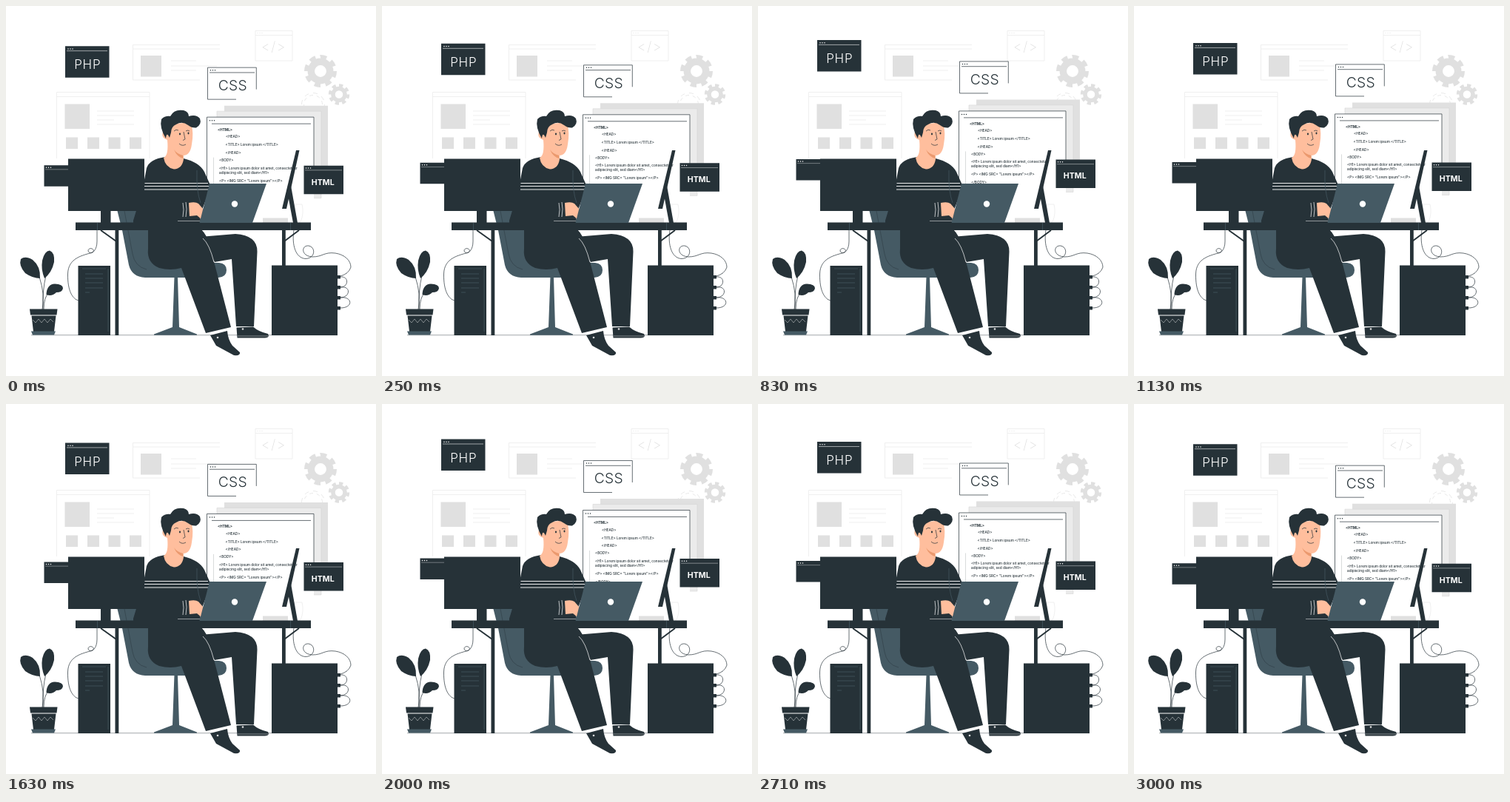
Write an HTML page that moves like this. It is 500 px wide and 500 px high and loops after 3.04 s.

```html
<!DOCTYPE html>
<html lang="en">
<head>
<meta charset="utf-8">
<title>Coder at a desk</title>
<style>
  html, body { margin: 0; width: 100%; height: 100%; overflow: hidden; background: #fff; }
  svg { display: block; width: 100%; height: 100%; font-family: Inter, "Open Sans", sans-serif; }
  .d { fill: #263238; }
  .s { fill: #455a64; }
  .g { fill: #e0e0e0; }
  .skin { fill: #ffbe9d; }
  .w { fill: #fff; }
  .line { fill: none; stroke: #263238; stroke-width: .7; }
  .pale { fill: none; stroke: #ebebeb; stroke-width: .8; }
  .light { fill: none; stroke: #fff; stroke-width: .7; }
  .dim { fill: none; stroke: #455a64; stroke-width: .7; }
  .dots { stroke-linecap: round; stroke-dasharray: 0 3; stroke-width: 1.5; }
  .mid { text-anchor: middle; }
  .code { font-size: 4.7px; font-weight: 500; }
  .code .b { font-weight: 700; }
  .gear { fill: none; stroke: #e0e0e0; }
</style>
</head>
<body>
<svg viewBox="0 0 500 500">
  <!-- pale windows -->
  <g class="pale">
    <path d="M289 52.500H171.500V100M171.500 58H289M171.500 100H262M223 74h34M223 81h62M223 87h34"/>
    <path d="M337 33.500h50V74H337zM337 39.500h50"/>
    <path class="dots" d="M340 36.500h7"/>
    <path d="M68.500 206V116.500H194V206M68.500 122.500H194M123 142h50M123 148h50M123 154h23M123 160h50"/>
  </g>
  <g class="g">
    <path d="M182 67h28v28.500h-28zM79.500 132.500H113V166H79.500z"/>
    <path d="M81 177.500h16V193H81zM110 177.500h16V193h-16zM138.500 177.500h16V193h-16zM167 177.500h16V193h-16z"/>
    <text class="mid" x="362" y="61" font-size="18" font-weight="200" letter-spacing="1.500">&lt;/&gt;</text>
  </g>
  <g class="gear">
    <circle cx="425" cy="88" r="12.700" stroke-width="9.500"/>
    <circle cx="425" cy="88" r="18.500" stroke-width="7" pathLength="80" stroke-dasharray="5.500 4.500"/>
    <circle cx="450" cy="119.500" r="8" stroke-width="5.500"/>
    <circle cx="450" cy="119.500" r="12" stroke-width="4.500" pathLength="80" stroke-dasharray="5.500 4.500"/>
    <circle cx="415" cy="133" r="15.500" stroke-width=".7" pathLength="80" stroke-dasharray="5 5"/>
    <circle cx="415" cy="133" r="12.500" stroke-width=".7" pathLength="80" stroke-dasharray="5 5" stroke-dashoffset="5"/>
  </g>

  <!-- floating windows -->
  <g id="float">
    <path class="g" d="M295 135h140v117H295z"/>
    <path d="M285 142.500h141V260H285z" fill="#ebebeb" stroke="#d6d6d6" stroke-width=".6"/>
    <path class="w" d="M271.500 150.500H416V268H271.500z"/>
    <path class="line" d="M271.500 268V150.500H416V252M278 159.500H412"/>
    <path class="line" d="M280.500 205V266" stroke-opacity=".25"/>
    <path class="line dots" d="M275.500 155h7"/>
    <g class="code d">
      <text class="b" x="286" y="169.500">&lt;HTML&gt;</text>
      <text x="297" y="178.700">&lt;HEAD&gt;</text>
      <text x="296.500" y="189.700">&lt;TITLE&gt; Lorem ipsum &lt;/TITLE&gt;</text>
      <text x="296.500" y="200.300">&lt;/HEAD&gt;</text>
      <text x="288" y="210.300">&lt;BODY&gt;</text>
      <text x="288" y="221">&lt;H1&gt; Lorem ipsum dolor sit amet, consectetuer</text>
      <text x="288" y="227">adipiscing elit, sed diam&lt;/H1&gt;</text>
      <text x="288" y="238">&lt;P&gt; &lt;IMG SRC= "Lorem ipsum"&gt;&lt;/P&gt;</text>
      <text x="288" y="249">&lt;/BODY&gt;</text>
    </g>

    <path class="d" d="M80 54.500h59.500V97H80z"/>
    <path class="light" d="M82 61h55" stroke-opacity=".8"/>
    <path class="light dots" d="M84 58.300h7"/>
    <text class="w mid" x="110.300" y="85.700" font-size="17" font-weight="300" letter-spacing=".800">PHP</text>

    <path class="w" d="M272.500 83.500H338V126.500H272.500z"/>
    <path class="line" d="M338.300 113V83.500H272.500V126.500H311M275 90.300h61"/>
    <path class="line dots" d="M276.500 87h7"/>
    <text class="d mid" x="306.300" y="114.300" font-size="19.300" font-weight="300" letter-spacing=".300">CSS</text>

    <path class="d" d="M402.500 216H456v38.500H402.500z"/>
    <path class="light" d="M404 222.200h50" stroke-opacity=".6"/>
    <path class="light dots" d="M405.500 219.300h7"/>
    <text class="w mid" x="428.300" y="242" font-size="10.600" font-weight="700">HTML</text>

    <path class="d" d="M51.500 215.500H92V244H51.500z"/>
    <path class="light" d="M53 221.200h38" stroke-opacity=".5"/>
    <path class="light dots" d="M54.500 218.500h7"/>
  </g>

  <path class="line" d="M34 444.700H448" stroke-opacity=".6"/>

  <!-- plant -->
  <path class="line" d="M49 410Q53 390 45 366M50 410Q49 385 54 364M51 410Q51 394 58 387"/>
  <path class="d" d="M46 368Q36 368 26 361Q17 351 20 342Q26 337 36 343Q47 352 46 368z"/>
  <path class="d" d="M52 368Q47 356 49 344Q52 331 59 330.500Q66 333 65 346Q62 360 52 368z"/>
  <path class="d" d="M54.500 390Q55 376 66 375.500Q77 376 77 381.500Q76 387 68 387Q62 393 54.500 390z"/>
  <path class="d" d="M32 409.500h37.500l-1 8h-35.500zM34.500 418.500h33L65 440H37z"/>
  <path class="light" d="M36 424l4 4 4-5 4 5 4-5 4 5 4-5 4 4" stroke-opacity=".6"/>
  <path class="s" d="M34 439.500h33l-2 5H36z"/>

  <!-- chair -->
  <path class="s" d="M150 275L157 303 166 350Q170 366 188 367H287Q298 366 298 357Q298 348 288 347H205L192 275z"/>
  <path class="line" d="M160 277L171 335Q174 352 190 356" stroke-opacity=".6"/>
  <path class="s" d="M227.500 366h4.500l2 68 24 9.500v1.200H200v-1.200l25-9.500z"/>

  <!-- tower and left cable -->
  <path class="line" d="M123 303V318C123 333 113 337 111 331C111 325 122 328 117 333C104 337 84 340 83.500 362C83 385 90 396 98 398"/>
  <path class="d" d="M97.500 351H141V445H97.500z"/>
  <path class="dim" d="M103 355H135M107 362h24M107 368h24M107 374h24M107 381h24M107 387h6M138 355V440"/>

  <!-- legs -->
  <path class="d" d="M262 312L310 308Q340 310 339.500 332L335 433H311L305 342 282 346z"/>
  <path class="d" d="M192 302H264Q271 309 275 322L304 434 270 442 237 354Q222 358 207 354Q190 347 192 328z"/>
  <path class="light" d="M266 314Q275 322 281 346"/>
  <path class="d" d="M276 445L299 439Q300 451 306 459L316 468Q317 473 308 472L284 459z"/>
  <path class="d" d="M311.500 434.500L334 433.500Q341 440 354 443Q357 448 350 448.500H312.500z"/>
  <path class="light" d="M313 446h41" stroke-opacity=".6"/>
  <circle class="g" cx="286" cy="448" r="1.300"/>
  <circle class="g" cx="320" cy="436.500" r="1.300"/>

  <!-- sweater -->
  <path class="d" d="M215 204Q194 207 190 219L184 250 172 290H263L262 283 277 244 268 224Q261 211 240 206z"/>
  <path class="light" d="M187.500 239.500H273M187 243.500H275M186.500 248H274" style="stroke-width:.9"/>
  <path class="light" d="M239 266q2 9 0 19M243 265q2 9 0 20"/>
  <path class="dim" d="M258 222Q257 250 263 266"/>
  <path class="skin" d="M247 266Q256 264 260 267L267 275 264 288 258 283 248 284z"/>

  <!-- head -->
  <path class="skin" d="M219 160L250 157Q254 171 251 187Q249 202 239.500 202L240 207Q238 220 227 220.500Q215 218 213 205Q220 202 218 181Q209 178 212 170Q216 167 219 171z"/>
  <path d="M239.500 202Q231 200 227 194Q231 204 239.500 206z" fill="#eb996e"/>
  <path class="d" d="M216 179Q207 164 210 153Q215 148 222 149Q227 139 240 141Q247 143 247 149Q257 146 262 152Q265 160 257 164.500Q251 165 246 161Q238 155 230 160Q223 163 223 171L221 178Q217 169 216 179z"/>
  <path class="line" d="M227 169q3-3 6-1M243 169q3-2 5 0M240 170l2 10-3 1.500M234 186q4 4 9 1" stroke-width=".9"/>
  <ellipse class="d" cx="235" cy="173" rx="1" ry="1.400"/>
  <ellipse class="d" cx="246.500" cy="172" rx="1" ry="1.400"/>

  <!-- left screen, desk -->
  <path class="d" d="M84 206.500H187V277H141.500v16H128V277H84z"/>
  <path class="pale" d="M390 268h10q3 12-2 24h-6q-5-12-2-24"/>
  <path class="g" d="M347 286.500h34V293H347z"/>
  <path class="d" d="M392 195h4.500L379 274h-6z"/>
  <path class="d" d="M380 250L384.500 240 394 293h-6z"/>
  <path class="d" d="M94 292.500H412V303H94z"/>
  <path class="dim" d="M123.500 293v10M384.500 293v10"/>
  <path class="d" d="M147.500 303h4.800V445h-4.800zM373 303h4.800v48H373z"/>
  <path class="line" d="M128 303l21 15M396 303L376 318" style="stroke-width:2"/>
  <path class="d" d="M172 289.500h60v3.500h-60zM232 290.500h32v2.500h-32z"/>
  <path class="s" d="M275 240H352L333 293H261.500z"/>
  <circle class="w" cx="309" cy="267.500" r="4.200"/>

  <!-- cabinet and right cables -->
  <path class="line" d="M389 303C386 322 391 341 405 341.500C418 341 419 326 409 324C399 323 398 338 414 339C428 339 430 332 445 334C458 336 466 344 466 353Q463 362 452 365"/>
  <path class="line" d="M452 366C464 365 463 380 452 380C467 378 465 394 452 394C468 392 470 408 452 408"/>
  <path class="d" d="M359 350.500H448V445H359zM448 364h4v4.500h-4zM448 378h4v4.500h-4zM448 392h4v4.500h-4zM448 406h4v4.500h-4z"/>
</svg>
<script>
  const LOOP = 3040, PERIOD = 1500, LEAD = 25, RISE = 10;
  const float = document.getElementById('float');

  function draw(now) {
    const phase = ((now % LOOP) + LEAD) % PERIOD / PERIOD;
    const lift = RISE * (1 - Math.abs(1 - 2 * phase));
    float.setAttribute('transform', `translate(0 ${-lift})`);
    requestAnimationFrame(draw);
  }
  draw(performance.now());
</script>
</body>
</html>
```
